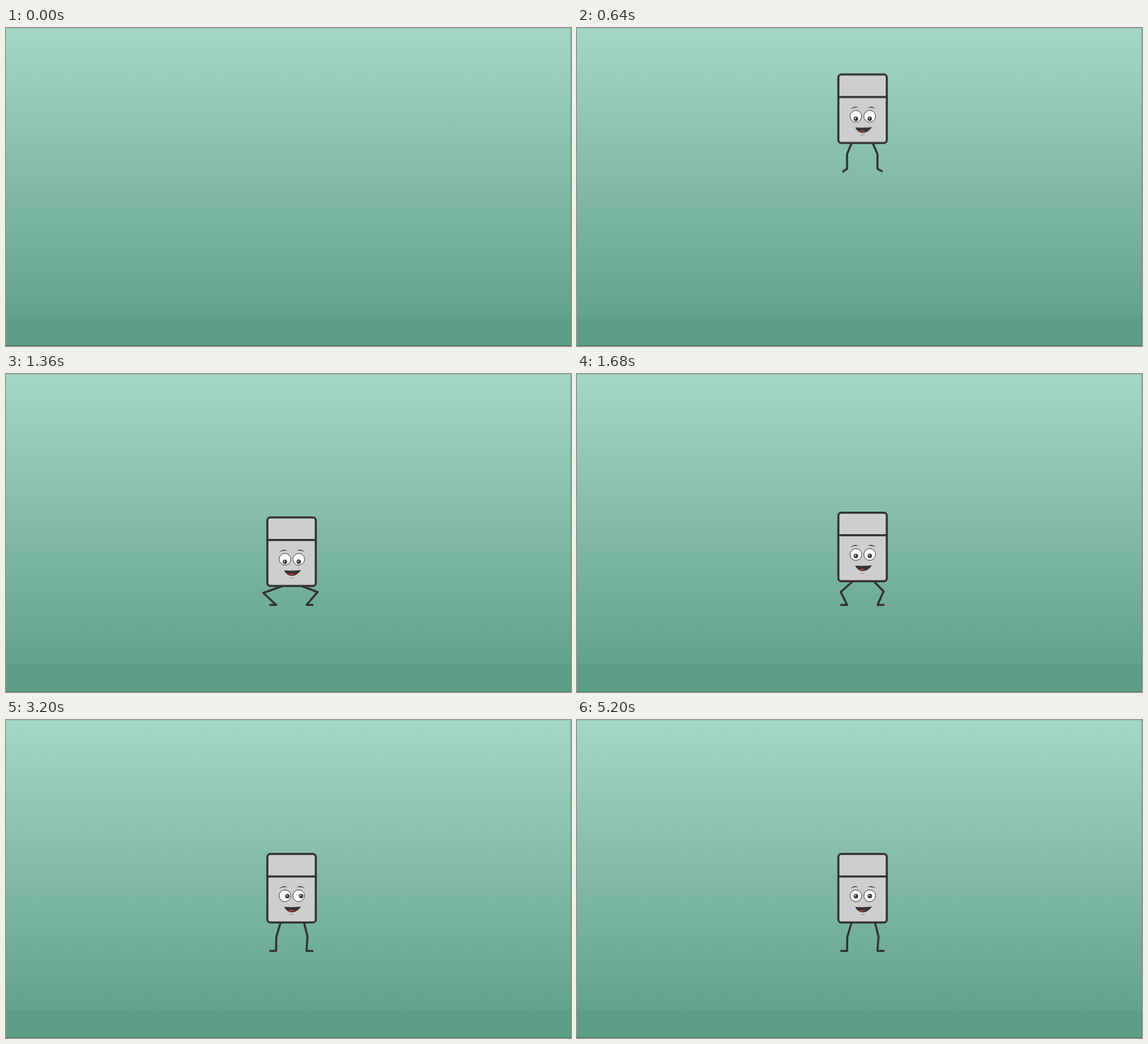
These frames come from a looping animation (952 px wide and 536 px high, 5680 ms). An HTML page without scripts:

```html
<!DOCTYPE html>
<html lang="en">
<head>
<meta charset="utf-8">
<title>Landing eraser</title>
<style>
html, body { margin: 0; width: 100%; height: 100%; overflow: hidden; background: #5d9f86; }
svg { display: block; width: 100vw; height: 100vh; }

.buddy, .pupils, .leg { animation: 5.68s linear infinite; }
.buddy { animation-name: drop; }
.pupils { animation-name: look; }
.left { animation-name: left-leg; }
.right { animation-name: right-leg; }

.ink { fill: none; stroke: #333; stroke-width: 3.5; stroke-linecap: round; stroke-linejoin: round; }
.eye { fill: #fff; stroke: #333; stroke-width: 1; }
.dark { fill: #333; }

/* every move advances in 80 ms steps */
@keyframes drop {
  0% { transform: translateY(-396.8px); animation-timing-function: steps(12); }
  16.9% { transform: translateY(-22.8px); animation-timing-function: steps(1); }
  18.309% { transform: translateY(0); animation-timing-function: steps(4); }
  23.943% { transform: translateY(16px); animation-timing-function: steps(8); }
  35.21%, 100% { transform: translateY(0); }
}

@keyframes left-leg {
  0% { d: path("M462.5 342L455 360L455 384.7L446 384.5"); animation-timing-function: steps(13); }
  18.309% { d: path("M462.5 342L455 360L455 384.7L450 392.3"); animation-timing-function: steps(4); }
  23.943% { d: path("M466 341.5L433.5 353L455.3 373.2L445 373.2"); animation-timing-function: steps(8); }
  35.21%, 100% { d: path("M462.5 342L455.5 365.5L455 389.2L445 389.2"); }
}

@keyframes right-leg {
  0% { d: path("M498.5 342L506.3 360L506.3 384.7L515 384"); animation-timing-function: steps(13); }
  18.309% { d: path("M498.5 342L506.3 360L506.3 384.7L512.8 391.7"); animation-timing-function: steps(4); }
  23.943% { d: path("M498.5 341.5L525 351.5L506.5 373.2L516.7 373.2"); animation-timing-function: steps(8); }
  35.21%, 100% { d: path("M502.3 342L508 365L506.3 389.2L516.7 389.2"); }
}

@keyframes look {
  0%, 23.943% { transform: translate(0, 3.6px); animation-timing-function: steps(8); }
  35.21% { transform: translate(0, 0); }
  52.11% { transform: translate(0, 0); animation-timing-function: steps(3); }
  56.337% { transform: translate(4.1px, 0); }
  69.01% { transform: translate(4.1px, 0); animation-timing-function: steps(4); }
  74.645% { transform: translate(-4.1px, 0); }
  87.32% { transform: translate(-4.1px, 0); animation-timing-function: steps(3); }
  91.545%, 100% { transform: translate(0, 0); }
}
</style>
</head>
<body>
<svg viewBox="0 0 952 536" preserveAspectRatio="none">
  <defs>
    <linearGradient id="sky" x1="0" y1="0" x2="0" y2="1">
      <stop offset="0" stop-color="#a6d6c6"/>
      <stop offset="1" stop-color="#62a38b"/>
    </linearGradient>
    <g id="pupil">
      <circle class="dark" r="3.7"/>
      <circle cx="-.8" cy="-.6" r="1.1" fill="#fff"/>
    </g>
  </defs>

  <rect width="952" height="488" fill="url(#sky)"/>
  <rect y="488" width="952" height="48" fill="#5d9f86"/>
  <rect width="952" height="1" fill="#95c2b2"/>
  <rect x="951" width="1" height="536" fill="#528c76" opacity=".6"/>
  <rect y="535" width="952" height="1" fill="#436b5c"/>

  <g class="buddy">
    <path class="ink leg left" d="M462.5 342L455.5 365.5L455 389.2L445 389.2"/>
    <path class="ink leg right" d="M502.3 342L508 365L506.3 389.2L516.7 389.2"/>

    <rect class="ink" x="440.4" y="225.8" width="81.6" height="115.4" rx="5" style="fill:#cecece"/>
    <path class="ink" d="M440.4 263.7H522"/>

    <path class="dark" d="M461 283.8Q467 277.8 474.3 281.6Q468 280.7 461 283.8Z"/>
    <path class="dark" d="M503.5 283.6Q497 277.8 489.7 281.6Q496 280.7 503.5 283.6Z"/>

    <circle class="eye" cx="470" cy="296.3" r="9.9"/>
    <circle class="eye" cx="493.2" cy="296.3" r="9.9"/>
    <g class="pupils">
      <use href="#pupil" x="469.9" y="296.9"/>
      <use href="#pupil" x="493.2" y="296.7"/>
    </g>

    <path class="dark" d="M468.6 315.1Q483 316 497.2 314.5Q490 324.3 481 324.3Q473 323.8 468.6 315.1Z"/>
    <path d="M475 321.4Q480.5 318 486.5 321.2Q481 324.6 475 321.4Z" fill="#b23a30"/>
    <path d="M477.3 327.5q3.7 1.5 7.4 0" fill="none" stroke="#777" stroke-width=".8"/>
  </g>
</svg>
</body>
</html>
```
